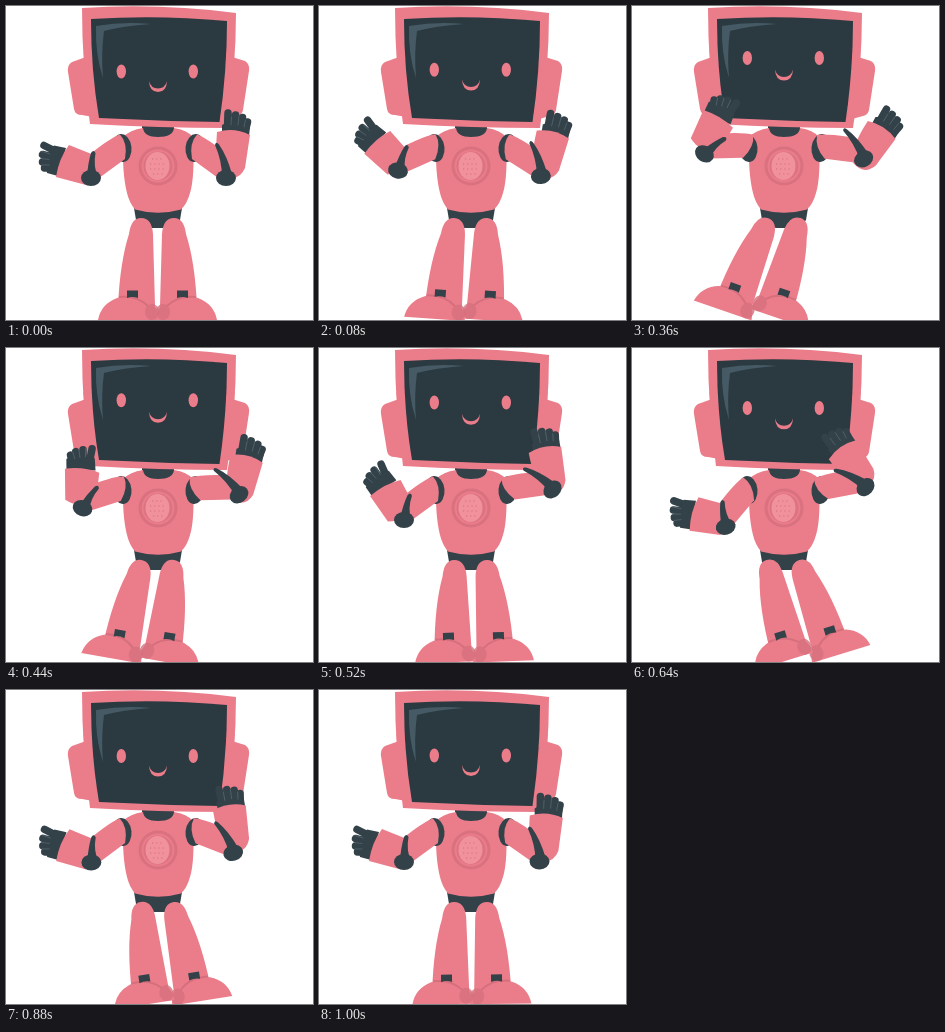
Recreate the animation shown at these times as an HTML page. Size 307 px wide and 314 px high, loop 1040 ms.

```html
<!DOCTYPE html>
<html lang="en">
<head>
<meta charset="utf-8">
<title>Dancing robot</title>
<style>
  html, body { margin: 0; width: 100%; height: 100%; overflow: hidden; background: #fff; }
  svg { display: block; width: 100vw; height: 100vh; }
  .pink { fill: #eb7d8b; }
  .dark { fill: #334149; }
  .screen { fill: #2b3940; }
  .shade { fill: #d66f7c; }
  .finger { fill: none; stroke: #334149; stroke-width: 7.5; stroke-linecap: round; }
  .crease { fill: none; stroke: #55656d; stroke-width: .8; stroke-linecap: round; }
</style>
</head>
<body>
<svg viewBox="0 0 307 314">
  <defs>
    <g id="leg">
      <path class="pink" d="M123 228Q125 212 135 212Q146 212 147 228L149 300H112Q114 256 123 228Z"/>
      <path class="pink" d="M92 314Q95 298 111 292Q124 288 138 292Q150 295 153 314Z"/>
      <path d="M113 291Q131 289 142 300" fill="none" stroke="#d66f7c" stroke-width="2"/>
      <path class="dark" d="M121 284.500H132V292Q126 290 121 292Z"/>
      <ellipse class="shade" cx="146" cy="306" rx="7" ry="8" opacity=".8"/>
    </g>
    <path id="upper" class="pink" d="M114 128.500Q106 131 88 145L82 160V170L93 172L119 153Q122 137 114 128.500Z"/>
    <ellipse id="socket" class="dark" cx="116" cy="142" rx="9.500" ry="14" transform="rotate(-6 116 142)"/>
  </defs>

  <path class="dark" d="M128 202H176L174 214Q168 222 160 222H145Q135 222 130 214Z"/>
  <g id="rightLeg"><use href="#leg" transform="translate(303) scale(-1 1)"/></g>
  <g id="leftLeg"><use href="#leg"/></g>

  <path class="dark" d="M136 118H168V130Q152 135 136 130Z"/>
  <path class="pink" d="M137 122Q138 131 152 131Q167 131 168 122Q181 124 187 131Q189 171 184 187Q181 198 175 203.500Q152 210 129 203.500Q123 196 121 187Q116 168 117 131Q124 124 137 122Z"/>
  <circle class="shade" cx="152" cy="160" r="19.5" opacity=".85"/>
  <circle class="pink" cx="152" cy="160" r="16.5"/>
  <circle class="shade" cx="152" cy="160" r="14.5" opacity=".7"/>
  <ellipse cx="151.5" cy="160" rx="12" ry="14" fill="#f0919c"/>
  <path d="M146 153h12M144 158h16M144 163h16M147 168h10" fill="none" stroke="#d66f7c" stroke-width="1.2" stroke-dasharray="1.2 3"/>

  <path class="pink" d="M80 51L66 56Q61 59 62 66L68 103Q69 109 76 109L87 111Z"/>
  <path class="pink" d="M226 51L239 55Q244 58 243 65L237 104Q236 109 231 110L220 113Z"/>
  <path class="pink" d="M76 2Q153 -3 230 7Q230 62 221 122Q153 122 84 118Q76 60 76 2Z"/>
  <path class="screen" d="M85 13Q153 8.500 221 15Q221 65 213.500 116Q153 115 93 112Q85 65 85 13Z"/>
  <path d="M90 20Q118 15 145 18Q116 20 98 25Q95 47 97 72Q89 48 90 20Z" fill="#455a64"/>
  <g id="eyes" class="pink">
    <ellipse cx="115.3" cy="65.5" rx="4.7" ry="7"/>
    <ellipse cx="187.3" cy="65.5" rx="4.7" ry="7"/>
  </g>
  <path id="mouth" class="pink" d="M143 75Q145 82.500 152 82.500Q159 82.500 161 75Q160.500 86 152 86Q143.500 86 143 75Z"/>

  <use href="#socket"/>
  <use href="#socket" transform="translate(305) scale(-1 1)"/>

  <g id="leftArm">
    <use href="#upper"/>
    <g id="leftFore">
      <path class="finger" d="M49 145L38 139.500M46 151L36.500 148.500M45 156L36.500 156M46 162L38.500 162"/>
      <path class="dark" d="M48 139.500L60 142L52 170L41 167Q37 152 48 139.500Z"/>
      <path class="crease" d="M36 145.500L44 148M35 152.500L43 153.500M36 159L43 159"/>
      <path class="pink" d="M63 139Q53 152 50 171L80 179Q94 167 88 149Z"/>
    </g>
    <path id="leftStrap" class="dark" d="M85 147Q87.500 143 89.500 147Q87 160 92 171L81 170Q82 157 85 147Z"/>
    <ellipse class="dark" cx="85" cy="172" rx="10" ry="8"/>
  </g>

  <g id="rightArm">
    <use href="#upper" transform="translate(305) scale(-1 1)"/>
    <g id="rightFore">
      <path class="finger" d="M221.500 123L222 107M229 120L229.500 109M235 121L236.500 111.500M240 122L241.500 116"/>
      <path class="dark" d="M216 119Q230 110 244 120L243 131L216 130Z"/>
      <path class="crease" d="M225.500 111L225 119M233 110L232 119M239.500 114L238 121"/>
      <path class="pink" d="M211 126Q228 121 244 129L239 162Q233 176 218 170Q208 160 211 126Z"/>
    </g>
    <path id="rightStrap" class="dark" d="M209 139Q210 135 213 138.500Q221 150 226 168L216 171Q216 155 209 139Z"/>
    <ellipse class="dark" cx="220" cy="172" rx="10" ry="8"/>
  </g>
</svg>
<script>
const LOOP = 1040, STEP = 40;
const times = [0, 200, 360, 520, 640, 800, 1000];
const tracks = {
  legs:       [0, 12, 19, -2.3, -17, -14.5, -0.8],
  leftUpper:  [0, 36, 35, 0, -14, -3, 0],
  leftFore:   [0, 83, 99, 40, -7, 0, 0],
  rightUpper: [0, -15, -29, -44, -47, -27, -1],
  rightFore:  [0, 25, 28, -16, -40, -25, -1],
  face:       [0, -6.5, -13.5, -11, -5.5, 0, 0]
};
const part = id => document.getElementById(id);
const count = times.length;

const timeAt = i => times[(i + count) % count] + LOOP * Math.floor(i / count);

// Periodic cubic through the key poses, with slopes from local parabolas.
function sample(values, t) {
  const value = i => values[(i + count) % count];
  const chord = i => (value(i + 1) - value(i)) / (timeAt(i + 1) - timeAt(i));
  const slope = i => {
    const before = timeAt(i) - timeAt(i - 1), after = timeAt(i + 1) - timeAt(i);
    return (chord(i - 1) * after + chord(i) * before) / (before + after);
  };
  let i = count - 1;
  while (times[i] > t) i--;
  const h = timeAt(i + 1) - times[i], u = (t - times[i]) / h, w = 1 - u;
  return w * w * (1 + 2 * u) * value(i) + u * u * (3 - 2 * u) * value(i + 1)
    + h * u * w * (w * slope(i) - u * slope(i + 1));
}

function rotate(id, angle, [x, y]) {
  part(id).setAttribute('transform', `rotate(${angle} ${x} ${y})`);
}

function shift(id, y) {
  part(id).setAttribute('transform', `translate(0 ${y})`);
}

function poseArm(side, upper, fore, { shoulder, hinge, elbow }) {
  rotate(side + 'Arm', upper, shoulder);
  rotate(side + 'Fore', fore - upper, hinge);
  rotate(side + 'Strap', (fore - upper) * 0.2, elbow);
}

const leftJoints = { shoulder: [117, 140], hinge: [82, 161], elbow: [85, 172] };
const rightJoints = { shoulder: [189, 140], hinge: [213, 162], elbow: [220, 172] };

function draw(t) {
  const at = name => sample(tracks[name], t);
  rotate('leftLeg', at('legs'), [135, 214]);
  rotate('rightLeg', at('legs'), [168, 214]);
  poseArm('left', at('leftUpper'), at('leftFore'), leftJoints);
  poseArm('right', at('rightUpper'), at('rightFore'), rightJoints);
  shift('eyes', at('face'));
  shift('mouth', at('face') * 0.85);
}

const start = performance.now();
function tick() {
  const elapsed = (performance.now() - start) % LOOP;
  draw(Math.floor(elapsed / STEP) * STEP);
  requestAnimationFrame(tick);
}
tick();
</script>
</body>
</html>
```
